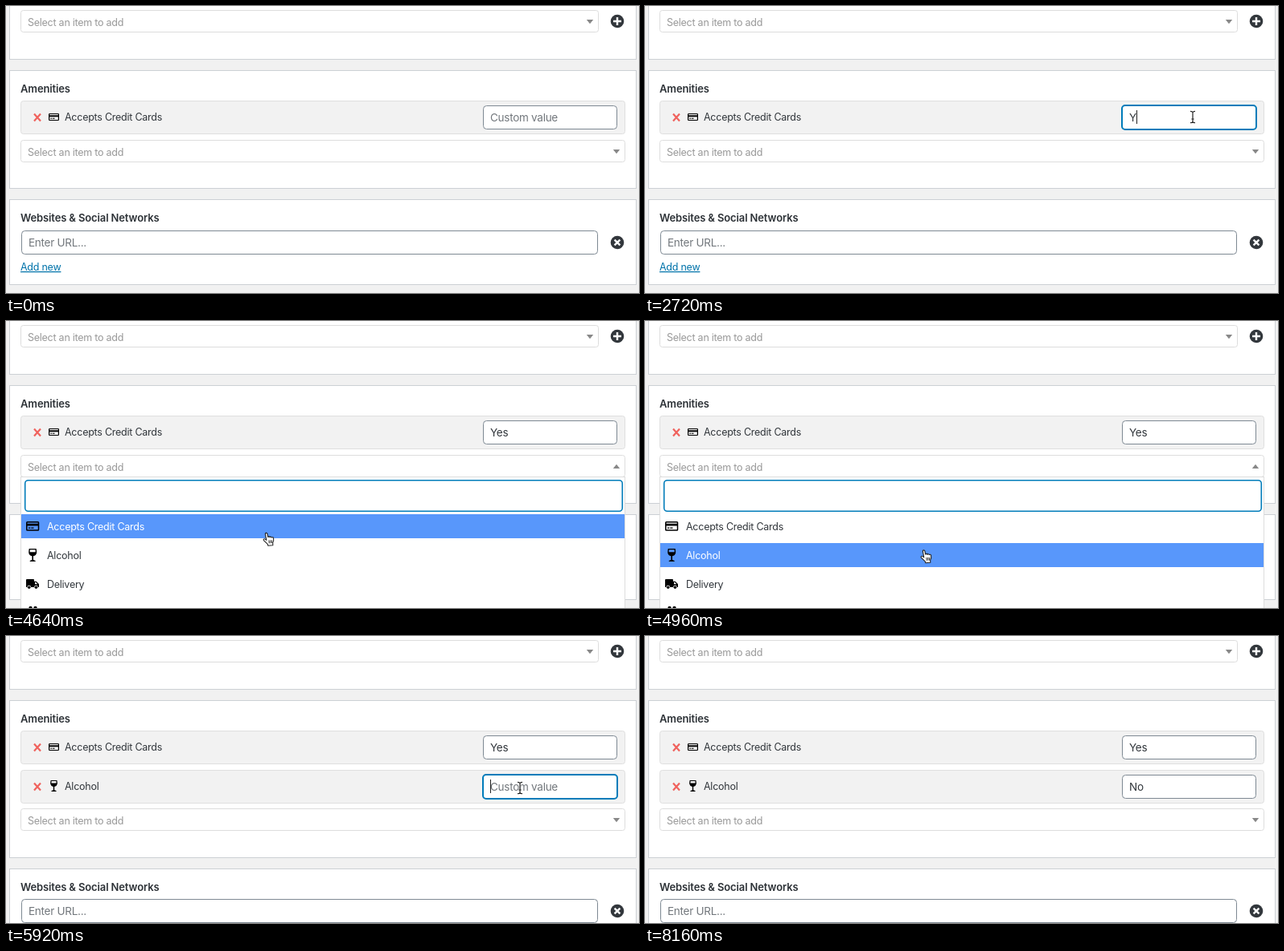
An HTML page for the animation above (8.32 s loop, 787 by 358 pixels).

```html
<!DOCTYPE html>
<html lang="en">
<head>
<meta charset="utf-8">
<title>Amenities form</title>
<style>
  html, body { margin: 0; width: 100%; height: 100%; overflow: hidden; background: #f1f1f1; }
  svg { display: block; width: 787px; height: 358px; }
  text { font: 12.5px Inter, Roboto, sans-serif; letter-spacing: -.02em; fill: #32373c; white-space: pre; }
  .head { font-size: 13px; font-weight: 600; letter-spacing: -.01em; fill: #2c3136; }
  .hint { fill: #999; }
  .entry { font-size: 13.5px; }
  .empty { fill: #72777c; }
  .link { fill: #0073aa; text-decoration: underline; }
  .panel { fill: #fff; stroke: #ccd0d4; }
  .select { fill: #fff; stroke: #ddd; }
  .row { fill: #f2f2f2; stroke: #dfdfdf; }
  .input { fill: #fff; stroke: #7e8993; }
  .focus { fill: #fff; stroke: #007cba; stroke-width: 2; }
  .arrow { fill: #888; }
  .red { stroke: #f0625d; stroke-width: 2.2; fill: none; }
  .badge { fill: #32373c; }
  .mark { stroke: #fff; stroke-width: 2.4; fill: none; }
  .caret { fill: #222; }
</style>
</head>
<body>
<svg viewBox="0 0 787 358">
  <defs>
    <g id="card">
      <path fill-rule="evenodd" d="M1.2 0h10.6q1.2 0 1.2 1.2v6.6q0 1.2-1.2 1.2H1.2Q0 9 0 7.8V1.2Q0 0 1.2 0zM1.2 1.1v1.1h10.6V1.1zM1.2 4.3v3.6h10.6V4.3z"/>
      <path d="M2.3 5.7h2v1.1h-2zM5 5.7h2.6v1.1H5z"/>
    </g>
    <g id="glass">
      <path fill-rule="evenodd" d="M.6 0h7.8q.6 3 .4 4.5Q8.2 7.4 5.2 8v4.2l2.3.8v1h-6v-1l2.3-.8V8Q.8 7.4.2 4.5 0 3 .6 0zM1.6 1.1 1.4 3.6h6.2L7.4 1.1z"/>
    </g>
    <g id="truck">
      <path d="M0 1q0-1 1-1h8q1 0 1 1v1.8h2.2q.6 0 1 .5l2.4 2.5q.4.4.4 1V10h-1.3a2.3 2.3 0 0 0-4.6 0H6a2.3 2.3 0 0 0-4.6 0H0z"/>
      <path fill="#fff" d="M11 4h1.2l2 2.2H11z"/>
      <circle cx="3.7" cy="10.3" r="1.8"/><circle cx="12.4" cy="10.3" r="1.8"/>
    </g>
    <path id="cross" class="red" d="M35 134.6l8 9M43 134.6l-8 9"/>
    <path id="down" class="arrow" d="M-4.2-2.4h8.4L0 2.8z"/>

    <path id="pointer" d="M.6.8v12.6l2.9-2.7 1.9 4.5 2.3-1-1.9-4.3 4-.2z" fill="#111" stroke="#fff" stroke-linejoin="round"/>
    <g id="hand" stroke="#222" stroke-width="1.1" stroke-linejoin="round" stroke-linecap="round">
      <path fill="#fff" d="M3.4 2.3C3.2.6 5.5.3 5.9 2l.9 4.2c.4-1.2 2-1.1 2.4.1.4-1 2-.8 2.3.4.6-.8 1.9-.4 2.1.8.4 2.3.1 4-.9 5.8l.1 3-6.1.4-.2-1.5-5.1-5c-.9-1.1.5-2.5 1.8-1.6l1.6 1.2z"/>
      <path fill="none" stroke-width=".9" d="M7.9 10.4l.3 3M9.7 10.3l.2 3M11.4 10.2l.1 2.9"/>
    </g>
    <g id="beam" fill="none">
      <path id="stem" d="M-3-6.7q2.6 0 3 1.4.4-1.4 3-1.4M0-5.3V6.3M-3 7.7q2.6 0 3-1.4.4 1.4 3 1.4M-1.6 3h3.2" stroke="#fff" stroke-width="2.4" stroke-opacity=".7"/>
      <path d="M-3-6.7q2.6 0 3 1.4.4-1.4 3-1.4M0-5.3V6.3M-3 7.7q2.6 0 3-1.4.4 1.4 3 1.4M-1.6 3h3.2" stroke="#222" stroke-width="1.2"/>
    </g>
  </defs>

  <rect width="787" height="358" fill="#f1f1f1"/>

  <!-- upper panel -->
  <rect class="panel" x="4.5" y="-9.5" width="779" height="76"/>
  <rect class="select" x="18.5" y="5.5" width="718" height="27" rx="3"/>
  <text class="hint" x="27" y="24.7">Select an item to add</text>
  <use href="#down" x="726" y="19.5"/>
  <circle class="badge" cx="760" cy="19" r="8.3"/>
  <path class="mark" d="M755 19h10M760 14v10"/>

  <!-- amenities -->
  <rect id="box" class="panel" x="4.5" y="80.5" width="779" height="147"/>
  <text class="head" x="18" y="108">Amenities</text>
  <g>
    <rect class="row" x="18.5" y="118.5" width="751" height="41" rx="3"/>
    <use href="#cross"/>
    <use href="#card" x="53" y="134"/>
    <text x="73" y="143.2">Accepts Credit Cards</text>
    <g id="first"></g>
  </g>
  <g id="added" transform="translate(0 49)">
    <rect class="row" x="18.5" y="118.5" width="751" height="41" rx="3"/>
    <use href="#cross"/>
    <use href="#glass" x="55" y="131"/>
    <text x="73" y="143.2">Alcohol</text>
    <g id="second"></g>
  </g>

  <!-- websites -->
  <g id="sitesHead">
    <rect class="panel" x="4.5" y="241.5" width="779" height="106"/>
    <text class="head" x="18" y="269">Websites &amp; Social Networks</text>
  </g>
  <g id="sites">
    <rect class="input" x="19.5" y="280.5" width="716" height="29" rx="4"/>
    <text class="entry empty" x="28" y="300">Enter URL...</text>
    <circle class="badge" cx="760" cy="295" r="8.3"/>
    <path class="mark" d="M756.6 291.6l6.8 6.8M763.4 291.6l-6.8 6.8"/>
    <text class="link" x="18" y="330">Add new</text>
  </g>

  <!-- picker -->
  <g id="picker">
    <g id="ring" fill="none">
      <rect x="16.5" y="165.5" width="755" height="31" rx="3" stroke="#b4d2fb" stroke-width="5"/>
      <rect x="17" y="166" width="754" height="30" rx="2.5" stroke="#5798f3" stroke-width="3"/>
    </g>
    <rect class="select" x="18.5" y="167.5" width="751" height="27" rx="3"/>
    <text class="hint" x="27" y="186.7">Select an item to add</text>
    <use id="tip" href="#down"/>
  </g>
  <g id="list">
    <rect class="select" x="18.5" y="194.5" width="751" height="180"/>
    <rect x="23.7" y="198.7" width="742.6" height="38.6" rx="4" fill="#fff" stroke="#007cba" stroke-width="1.6"/>
    <rect id="hover" x="19" width="750" height="30" fill="#5897fb"/>
    <use href="#card" transform="translate(25 250) scale(1.25 1.3)"/>
    <use href="#glass" transform="translate(28 284) scale(1.15)"/>
    <use href="#truck" transform="translate(25 322)"/>
    <circle cx="30.5" cy="358" r="2.2"/><circle cx="36.5" cy="358" r="2.2"/>
    <text class="item" x="51" y="261">Accepts Credit Cards</text>
    <text class="item" x="51" y="297">Alcohol</text>
    <text class="item" x="51" y="333">Delivery</text>
  </g>

  <use id="cursor"/>
</svg>

<script>
const LOOP = 8320;
const $ = id => document.getElementById(id);
const show = (el, on) => el.setAttribute('display', on ? 'inline' : 'none');
const shift = (el, y) => el.setAttribute('transform', `translate(0 ${y})`);

// Each track is a list of [start ms, ...values], held until the next entry.
const at = (track, t) => track.findLast(step => step[0] <= t);

const cursorTrack = [
  [0, ''],
  [160, 'pointer', 391, 265], [320, 'pointer', 462, 222], [480, 'pointer', 580, 172],
  [640, 'pointer', 701, 140], [800, 'pointer', 690, 143],
  [1120, 'pointer', 667, 128], [1280, 'pointer', 681, 136],
  [2080, 'beam', 681, 138],
  [3360, 'beam', 668, 146], [3520, 'hand', 612, 172], [3680, 'hand', 562, 181],
  [3840, 'hand', 546.5, 181.5], [4160, 'hand', 490, 205], [4320, 'hand', 390, 246],
  [4480, 'hand', 333, 261], [4640, 'hand', 319, 263.5],
  [4800, 'hand', 326, 281], [4960, 'hand', 342, 285], [5120, 'pointer', 398, 270],
  [5280, 'hand', 475, 241], [5440, 'hand', 556, 218],
  [5600, 'beam', 628, 194], [5760, 'beam', 642, 187], [5920, 'beam', 639, 189],
  [7360, 'pointer', 631, 258], [7520, 'beam', 637, 335], [7680, '']
];

// [start, text, focused, caret x or 0]
const firstTrack = [
  [0, '', 0, 0], [2080, '', 1, 602], [2560, '', 1, 0],
  [2720, 'Y', 1, 611], [2880, 'Ye', 1, 617], [3040, 'Yes', 1, 624],
  [3520, 'Yes', 1, 0], [3840, 'Yes', 0, 0]
];
const secondTrack = [
  [0, '', 0, 0], [5920, '', 1, 602], [6400, 'N', 1, 612], [6560, 'No', 1, 620],
  [7040, 'No', 1, 0], [7520, 'No', 1, 620], [8000, 'No', 1, 0], [8160, 'No', 0, 0]
];
// Highlighted item, or -1 when the list is closed.
const listTrack = [[0, -1], [4000, 0], [4800, 1], [5120, -1]];

function input(el, [, text, focused, caret]) {
  const frame = focused
    ? '<rect class="focus" x="593" y="124" width="167" height="30" rx="4"/>'
    : '<rect class="input" x="593.5" y="124.5" width="166" height="29" rx="4"/>';
  const html = frame +
    `<text class="entry${text ? '' : ' empty'}" x="602" y="144">${text || 'Custom value'}</text>` +
    (caret ? `<rect class="caret" x="${caret}" y="130" width="1" height="17"/>` : '');
  if (el.dataset.html !== html) el.innerHTML = el.dataset.html = html;
}

function draw(now) {
  const t = now % LOOP;
  const item = at(listTrack, t)[1];
  const open = item >= 0;
  const grown = t >= 5120;

  input($('first'), at(firstTrack, t));
  input($('second'), at(secondTrack, t));

  show($('added'), grown);
  $('box').setAttribute('height', grown ? 196 : 147);
  shift($('sitesHead'), grown ? 49 : 0);
  shift($('sites'), grown ? 48 : 0);
  shift($('picker'), grown ? 48 : 0);
  show($('ring'), t >= 5120 && t < 5920);
  $('tip').setAttribute('transform', `translate(759 181.5) scale(1 ${open ? -1 : 1})`);

  show($('list'), open);
  $('hover').setAttribute('y', 241 + 36 * Math.max(item, 0));
  document.querySelectorAll('.item').forEach((el, i) => {
    el.style.fill = i === item ? '#fff' : '';
  });

  const [, shape, x, y] = at(cursorTrack, t);
  show($('cursor'), shape);
  if (shape) {
    $('cursor').setAttribute('href', '#' + shape);
    $('cursor').setAttribute('transform', `translate(${x} ${y})`);
  }
}

let start;
function tick(now) {
  start ??= now;
  draw(now - start);
  requestAnimationFrame(tick);
}
draw(0);
requestAnimationFrame(tick);
</script>
</body>
</html>
```
